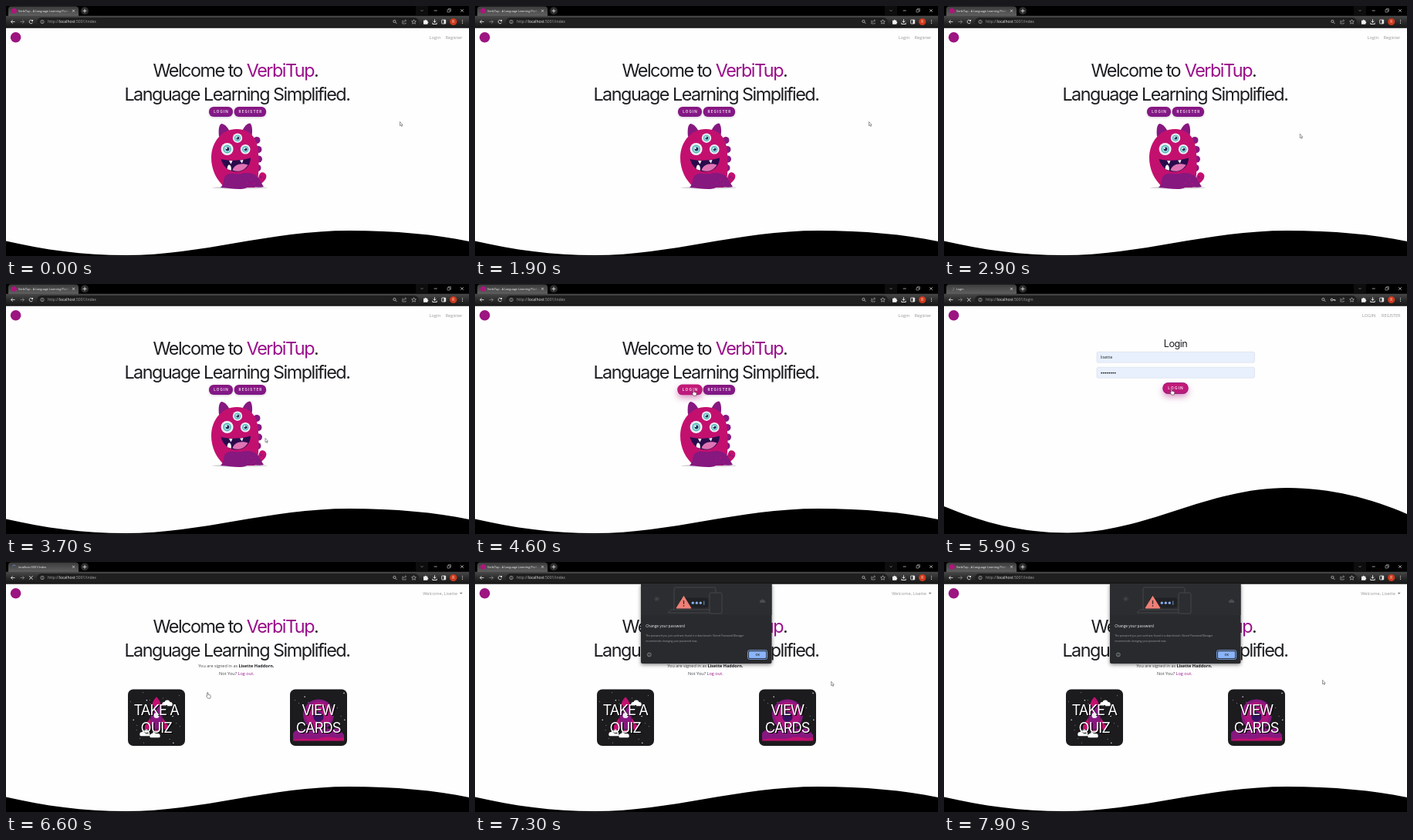
Write an HTML page with a canvas that moves like this. It is 600 by 325 pixels and loops after 8 s.

```html
<!DOCTYPE html>
<html lang="en">
<head>
<meta charset="utf-8">
<title>VerbiTup</title>
<style>
  html, body { margin: 0; width: 100%; height: 100%; overflow: hidden; background: #fefefe; }
  canvas { display: block; width: 600px; height: 325px; }
</style>
</head>
<body>
<canvas id="stage"></canvas>
<script>
const W = 600, H = 325, LOOP = 8000, STEP = 100;
const BRAND = 'VerbiTup';
const SANS = '"Open Sans", "Noto Sans", sans-serif';
const INTER = 'Inter, "Liberation Sans", sans-serif';
const PINK = '#c3106f', PURPLE = '#86187f', INK = '#1c1e21';

const canvas = document.getElementById('stage');
const ratio = window.devicePixelRatio || 1;
canvas.width = W * ratio;
canvas.height = H * ratio;
const c = canvas.getContext('2d');

// Moments at which the screen changes
const T = { hover: 4200, login: 4800, formHover: 5100, submit: 5700, url: 6500, home: 6600, loaded: 6800, dialog: 7000 };

// Pointer stops: time, x, y
const STOPS = [
  [0, 510.5, 150.5], [2500, 510.5, 150.5], [3300, 412, 182], [3700, 336, 200.5], [4200, 281.3, 137.3],
  [4900, 281.3, 137.3], [5500, 293, 136], [6000, 293, 136], [6500, 263, 164],
  [6600, 259.5, 169.2], [7400, 490.5, 153.5], [8000, 490.5, 153.5]
];

const clamp = v => Math.max(0, Math.min(1, v));
const mix = (a, b, k) => a + (b - a) * k;

function pointerAt(t) {
  const i = STOPS.findIndex(s => s[0] > t);
  const [t0, x0, y0] = STOPS[i - 1], [t1, x1, y1] = STOPS[i];
  const k = (t - t0) / (t1 - t0);
  return [mix(x0, x1, k), mix(y0, y1, k)];
}

function text(s, x, y, size, color, o = {}) {
  c.font = `${o.weight || 400} ${size}px ${o.font || SANS}`;
  c.letterSpacing = (o.track || 0) + 'px';
  c.textAlign = o.align || 'left';
  c.fillStyle = color;
  c.fillText(s, x, y);
  return c.measureText(s).width;
}

function box(x, y, w, h, r, fill, stroke, lw = 0.5) {
  c.beginPath();
  c.roundRect(x, y, w, h, r);
  paint(fill, stroke, lw);
}

function paint(fill, stroke, lw = 0.7) {
  if (fill) { c.fillStyle = fill; c.fill(); }
  if (stroke) { c.strokeStyle = stroke; c.lineWidth = lw; c.stroke(); }
}

function oval(x, y, rx, ry, fill, stroke, lw) {
  c.beginPath();
  c.ellipse(x, y, rx, ry, 0, 0, 7);
  paint(fill, stroke, lw);
}

const dot = (x, y, r, fill, stroke, lw) => oval(x, y, r, r, fill, stroke, lw);

function shape(d, fill, stroke, lw) {
  const p = new Path2D(d);
  if (fill) { c.fillStyle = fill; c.fill(p); }
  if (stroke) { c.strokeStyle = stroke; c.lineWidth = lw || 0.8; c.stroke(p); }
}

function fade(x0, y0, x1, y1, ...colors) {
  const g = c.createLinearGradient(x0, y0, x1, y1);
  colors.forEach((col, i) => g.addColorStop(i / (colors.length - 1), col));
  return g;
}

function at(x, y, draw, scale = 1) {
  c.save();
  c.translate(x, y);
  c.scale(scale, scale);
  draw();
  c.restore();
}

/* ---------- browser window ---------- */

function tab(t) {
  box(3, 0.5, 91, 14, [4, 4, 0, 0], fade(0, 0, 0, 13, '#3a3a3a', '#606060'));
  const busy = t >= T.submit && t < T.loaded;
  const title = t >= T.login && t < T.url ? 'Login'
    : t >= T.url && t < T.loaded ? 'localhost:5001/index'
    : BRAND + ' - A Language Learning Platform';
  if (busy) {
    const a = t / 160;
    c.beginPath();
    c.arc(10.5, 6.3, 2.3, a, a + 2.2);
    paint(null, t < T.url ? '#8a8a8a' : '#6f9be8', 0.8);
  } else dot(10.5, 6.3, 3.4, '#b0157c');
  c.save();
  c.beginPath();
  c.rect(15, 0, 67, 13);
  c.clip();
  text(title, 16, 7.8, 3.75, fade(74, 0, 82, 0, '#f4f4f4', 'rgba(244,244,244,0)'));
  c.restore();
  shape('M86 4.8l3 3m0-3l-3 3', null, '#e8e8e8', 0.7);
  dot(102, 6.3, 5, '#2d2d2d');
  shape('M99.5 6.3h5M102 3.8v5', null, '#f0f0f0', 0.8);
}

function windowButtons() {
  box(531, 0, 16, 12, 0, '#0d0d0d');
  shape('M537.4 5.2l1.6 1.6 1.6-1.6', null, '#a8a8a8', 0.6);
  shape('M554.7 6h4M589.2 4.2l3.6 3.6m0-3.6l-3.6 3.6', null, '#e8e8e8', 0.65);
  shape('M572 4.8h3.2v3.2h-3.2zM573.2 4.6v-1h3.2v3.2h-1', null, '#e8e8e8', 0.5);
}

function toolbar(t) {
  box(0, 12.8, W, 16, 0, fade(0, 13, 0, 29, '#484848', '#2a2a2a', '#131313'));
  box(40, 15, 495, 11.5, 5.7, '#1f1f20');
  shape('M11.5 20.5h-5m2.2-2.3l-2.3 2.3 2.3 2.3', null, '#f0f0f0');
  shape('M18.5 20.5h5m-2.2-2.3l2.3 2.3-2.3 2.3', null, '#8b8b8b');
  if (t >= T.submit && t < T.loaded) shape('M30.2 18.3l4.4 4.4m0-4.4l-4.4 4.4', null, '#f0f0f0', 0.9);
  else {
    c.beginPath();
    c.arc(32.4, 20.5, 2.3, 0.4, 5.4);
    paint(null, '#f0f0f0', 0.8);
    shape('M35 17.6v2.4h-2.4z', '#f0f0f0');
  }
  dot(47, 20.5, 2.2, null, '#c9c9c9', 0.6);
  shape('M47 20.2v1.5M47 19v.6', null, '#c9c9c9', 0.6);

  let x = 54;
  const page = t >= T.login && t < T.url ? 'login' : 'index';
  x += text('http://', x, 22.4, 5, '#a6a6a6');
  x += text('localhost', x, 22.4, 5, '#f4f4f4');
  text(':5001/' + page, x, 22.4, 5, '#a6a6a6');

  const key = t >= T.login && t < T.url;
  at(key ? 492 : 504, 20.5, () => {
    dot(-0.6, -0.6, 1.6, null, '#d4d4d4', 0.7);
    shape('M.7 .7l1.7 1.7', null, '#d4d4d4', 0.8);
  });
  if (key) {
    dot(502.6, 20.5, 1.4, null, '#e4e4e4', 0.9);
    shape('M504 20.5h3v1.6m-1.2-1.6v1.3', null, '#e4e4e4', 0.8);
  }
  shape('M515 19.2h-1.2v3.8h4.4v-1.4M515.5 21.5c0-2 1-2.6 3-2.6m-1.3-1.4l1.4 1.4-1.4 1.4', null, '#bdbdbd', 0.6);
  shape('M528.5 17.7l.9 1.9 2 .2-1.5 1.4.4 2-1.8-1-1.8 1 .4-2-1.5-1.4 2-.2z', null, '#d4d4d4', 0.6);
  shape('M541 18.8h1.7a1 1 0 0 1 2 0h1.6v1.7a1 1 0 0 1 0 2v1.2h-5.3z', '#f2f2f2');
  shape('M555.5 17.3v4m-1.9-1.7l1.9 1.8 1.9-1.8M552.8 21.7v1.8h5.4v-1.8', null, '#f2f2f2', 0.9);
  box(564.7, 18, 5, 5, 0.5, null, '#f2f2f2', 0.8);
  box(567.5, 18, 2.2, 5, 0, '#f2f2f2');
  dot(579.7, 20.5, 4.6, '#d0391b');
  text('R', 579.7, 22.1, 4.4, '#fff', { align: 'center' });
  for (const dy of [-2, 0, 2]) dot(591.5, 20.5 + dy, 0.6, '#f0f0f0');
}

function chrome(t) {
  box(0, 0, W, 14, 0, '#000');
  tab(t);
  windowButtons();
  toolbar(t);
}

/* ---------- page parts ---------- */

const HOME_WAVE = 'M0 305.5C50 317 100 324 155 324C255 324 340 292 445 292C505 292 556 297 600 306V325H0Z';
const LOGIN_WAVE = 'M0 289C50 310 100 323.5 160 323.5C262 323.5 340 265 445 265C500 265 555 279 600 299V325H0Z';

function pill(label, cx, cy, w, h, k) {
  const s = 1 + 0.05 * k;
  at(cx, cy, () => {
    c.save();
    c.shadowColor = k ? `rgba(170,16,120,${0.2 + 0.25 * k})` : 'rgba(60,0,60,.22)';
    c.shadowBlur = mix(3, 8, k) * ratio;
    c.shadowOffsetY = mix(1, 4, k) * ratio;
    const tone = d => `rgb(${mix(137, 196, k) - d},${mix(24, 26, k)},${mix(130, 120, k) + d / 2})`;
    box(-w / 2, -h / 2, w, h, 6, fade(0, -h / 2, 0, h / 2, tone(0), tone(10)));
    c.restore();
    text(label, 0.6, 1.7, 4.6, '#f6e9f5', { font: INTER, weight: 600, track: 1.08, align: 'center' });
  }, s);
}

function headline() {
  const o = { font: INTER, weight: 400, track: -1.5 };
  text('Welcome to', 190.4, 92.4, 23.4, INK, o);
  const w = text(BRAND, 311.7, 92.4, 23.4, '#9a0f8a', o);
  text('.', 311.7 + w, 92.4, 23.4, INK, o);
  text('Language Learning Simplified.', 299.4, 122.9, 23.4, INK, { ...o, align: 'center' });
}

function eye(x, y, r) {
  dot(x, y, r, '#f0f1f6');
  dot(x, y, r * 0.68, '#4fb4bc');
  dot(x, y, r * 0.5, '#9fdcdc');
  dot(x + r * 0.05, y, r * 0.3, '#1f2350');
  dot(x - r * 0.12, y - r * 0.14, r * 0.13, '#fff');
}

function monster() {
  oval(303, 236.3, 36, 1.4, '#d3d1d6');
  for (const [x, y] of [[325, 174.5], [327, 186.5], [327.5, 199], [326, 210.5]]) dot(x, y, 4.5, PURPLE);
  shape('M276 170C275 160 276 154 279.5 153C284 154 288 158 290 164Z', PURPLE);
  shape('M306 163C308 157 313 152 316.5 152.5C319 155 320 163 318 171Z', PURPLE);
  shape('M300 160C282 159 266 175 266 197C266 213 273 227 284 236H322C328 228 328 210 327 191C326 172 317 161 300 160Z', PINK);
  shape('M322 232C328 229 326 222 329 218C331 215 336 216 337.3 220C338 225 334 228 331 231C328 234 325 236 322 232Z', PINK);
  shape('M278 236C284 231 280 223 286 219.5C292 216 298 219 305 218C312 216 320 217 325 221C329 225 331 231 334 235C328 237 318 234 312 236C306 240 292 237 278 236Z', PURPLE);
  dot(330.5, 222.5, 1.4, PURPLE);
  dot(334, 224, 1, PURPLE);
  for (const [x, y] of [[313, 230], [318, 226], [322, 231]]) dot(x, y, 1.1, '#b0127c');
  shape('M278.5 199C290 202 304 201 317 197.5C317 208 309 215.5 299 215.5C288 215.5 281 208 278.5 199Z', '#2a0b4c');
  shape('M293.5 213.5C295 206.5 304 203 313.5 206.5C310 213 302 217 293.5 213.5Z', '#df73b4');
  shape('M289 201l4.5 .2-2 4.3zM303 200.7l4.5-.8-1.6 4.6z', '#fff');
  shape('M286.8 212c0-4 1-5.4 2.6-5.4s2.8 3 2.4 7.2z', '#fff');
  eye(300, 171.7, 6.2);
  eye(286.6, 186, 8);
  eye(310.2, 186.3, 6.3);
}

function logo() { dot(12.6, 40.7, 6.8, '#9c1581'); }

function index(t) {
  const grey = '#989898';
  text('Login', 548.5, 43, 5.8, grey);
  text('Register', 591.3, 43, 5.8, grey, { align: 'right' });
  headline();
  pill('REGISTER', 316.4, 137.4, 41.5, 13, 0);
  pill('LOGIN', 278.5, 137.4, 31, 13, clamp((t - T.hover) / 300));
  monster();
  shape(HOME_WAVE, '#000');
}

function field(y) { box(198, y, 204.5, 14, 2, '#e8f0fe', '#ced4da', 0.5); }

function login(t) {
  text('LOGIN', 541.8, 43, 5.8, '#989898');
  text('REGISTER', 591.5, 43, 5.5, '#989898', { align: 'right' });
  text('Login', 300, 81.6, 12.6, INK, { font: INTER, track: -0.5, align: 'center' });
  field(88.2);
  field(108.2);
  text('lisette', 203, 97.2, 5.4, INK);
  for (let i = 0; i < 8; i++) dot(204.2 + i * 2.5, 115.6, 0.95, '#16181b');
  pill('LOGIN', 300, 135.5, 31, 13.4, clamp((t - T.formHover) / 300));
  if (t >= T.submit) box(283.8, 128.5, 32.4, 14, 6.5, null, '#8d1278', 0.8);
  shape(LOGIN_WAVE, '#000');
}

function stars(seed) {
  for (let i = 1; i < 24; i++) {
    const x = (i * 29.7 + seed) % 68, y = (i * i * 7.3 + seed * 3) % 66;
    dot(3 + x, 4 + y, i % 4 ? 0.45 : 0.8, '#e8e4ee');
  }
}

function cloud(x, y) {
  dot(x - 4, y, 2.6, '#fff');
  dot(x, y - 1.6, 3.5, '#fff');
  dot(x + 4, y, 2.6, '#fff');
  box(x - 6.5, y, 13, 2.7, 1.3, '#fff');
}

function rocket() {
  shape('M29 37L22 47V54L31 50ZM45 37L52 47V54L43 50Z', PINK);
  shape('M37 10C29 17 28 38 31 52H43C46 38 45 17 37 10Z', PURPLE);
  shape('M37 10C33 14 31.5 18 31 22H43C42.5 18 41 14 37 10Z', PINK);
  dot(37, 34, 3.6, '#efe9f4');
  shape('M34 53H40L37 62Z', '#e0468f');
  cloud(51, 19);
  cloud(22, 58);
  cloud(35, 60);
}

function planet() {
  dot(37, 33, 20, PURPLE);
  dot(37, 33, 16.5, '#ab147c');
  dot(37, 36, 6.5, '#35135f');
  shape('M4 66V57C9 49 15 57 20 52C27 46 33 57 40 52C47 47 53 55 58 51C64 49 67 56 70 59V66Z', PURPLE);
  shape('M4 66C18 61 29 67 41 63C53 60 61 66 70 62V67H4Z', PINK);
}

function card(x, art, seed, lines) {
  at(x, 165.5, () => {
    box(0, 0, 74, 73.5, 7, '#1c1b1e');
    stars(seed);
    art();
    const o = { font: INTER, weight: 400, track: -1, align: 'center' };
    lines.forEach((s, i) => {
      const y = 33 + i * 23;
      text(s, 38, y + 1.5, 18.4, '#000', o);
      text(s, 36.7, y, 18.4, '#fff', o);
    });
  });
}

function home() {
  text('Welcome, Lisette', 585, 43, 5.7, '#989898', { align: 'right' });
  shape('M587.8 39.8h3.8l-1.9 2.2z', '#858585');
  headline();
  const x = 249.3 + text('You are signed in as ', 249.3, 137.2, 5.5, '#43474b');
  text('Lisette Haddorn.', x, 137.2, 5.5, INK, { weight: 700 });
  const w = text('Not You? ', 276, 146.6, 5.6, '#43474b');
  text('Log out.', 276 + w, 146.6, 5.6, '#9a118c');
  card(158, rocket, 5, ['TAKE A', 'QUIZ']);
  card(368, planet, 17, ['VIEW', 'CARDS']);
  shape(HOME_WAVE, '#000');
}

function dialog() {
  c.save();
  c.shadowColor = 'rgba(0,0,0,.5)';
  c.shadowBlur = 5 * ratio;
  c.shadowOffsetY = 1.5 * ratio;
  box(215, 28, 169.5, 104, [0, 0, 2, 2], '#292a2d');
  c.restore();
  const line = '#4a4c51';
  box(215, 28, 169.5, 41, 0, '#2c2d30');
  shape('M258 62V35Q258 33 260 33H310Q312 33 312 35V62M250 66H320L316 62H254Z', null, line);
  box(304, 40, 16, 27, 2, '#2c2d30', line, 0.8);
  shape('M232 48h7M233.8 45l3.4 6M237.2 45l-3.4 6', null, line, 0.9);
  shape('M369.5 53a2 2 0 0 1 1-3.4a2.6 2.6 0 0 1 4.6 .4a1.7 1.7 0 0 1 .7 3z', line);
  box(266, 46.5, 36, 13, 3, '#202124');
  shape('M270.5 44.5L280 60H261Z', '#ee8077', '#ee8077', 1);
  shape('M270.5 50v4.7M270.5 56.3v1.4', null, '#34262a', 1.3);
  for (let i = 0; i < 3; i++) dot(282.3 + i * 5, 53.2, 1.6, '#8ab4f8');
  shape('M296.8 50.6v5.2', null, '#8ab4f8', 0.8);
  text('Change your password', 221.3, 84.6, 4.75, '#f1f3f4');
  text('The password you just used was found in a data breach. Norvel Password Manager', 221.3, 97.3, 3.3, '#9aa0a6');
  text('recommends changing your password now.', 221.3, 103.6, 3.3, '#9aa0a6');
  dot(225.8, 120.5, 2.4, null, '#b4b8bd', 0.6);
  shape('M225.8 120.2v1.6M225.8 118.8v.6', null, '#b4b8bd', 0.6);
  box(353.6, 114.8, 25, 11.6, 2, '#292a2d', '#7ba4e6', 1);
  box(355, 116.2, 22.2, 8.8, 1.2, '#8ab4f8');
  text('OK', 366.1, 122, 3.8, '#202124', { align: 'center', weight: 600 });
}

/* ---------- pointer ---------- */

function pointer(t) {
  const [x, y] = pointerAt(t);
  const hand = t >= T.hover && t <= T.home;
  at(x, y, () => {
    if (hand) shape('M1.2 .6Q2 0 2.5 .8V3.2L5 3.8Q6 4.2 5.8 5.4L5.2 8H2L.2 5.2Q-.2 4.3 1.2 4.6Z', '#fff', '#222', 0.5);
    else shape('M0 0V5.2L1.2 4.2L2.1 6.1L3 5.7L2.2 3.9H3.6Z', '#fff', '#222', 0.45);
  });
}

function draw(t) {
  c.setTransform(ratio, 0, 0, ratio, 0, 0);
  box(0, 0, W, H, 0, '#fefefe');
  if (t < T.login) index(t);
  else if (t < T.home) login(t);
  else home();
  logo();
  chrome(t);
  if (t >= T.dialog) dialog();
  pointer(t);
}

const start = performance.now();
function frame() {
  const t = (performance.now() - start) % LOOP;
  draw(Math.floor(t / STEP) * STEP);
  requestAnimationFrame(frame);
}
frame();
</script>
</body>
</html>
```
